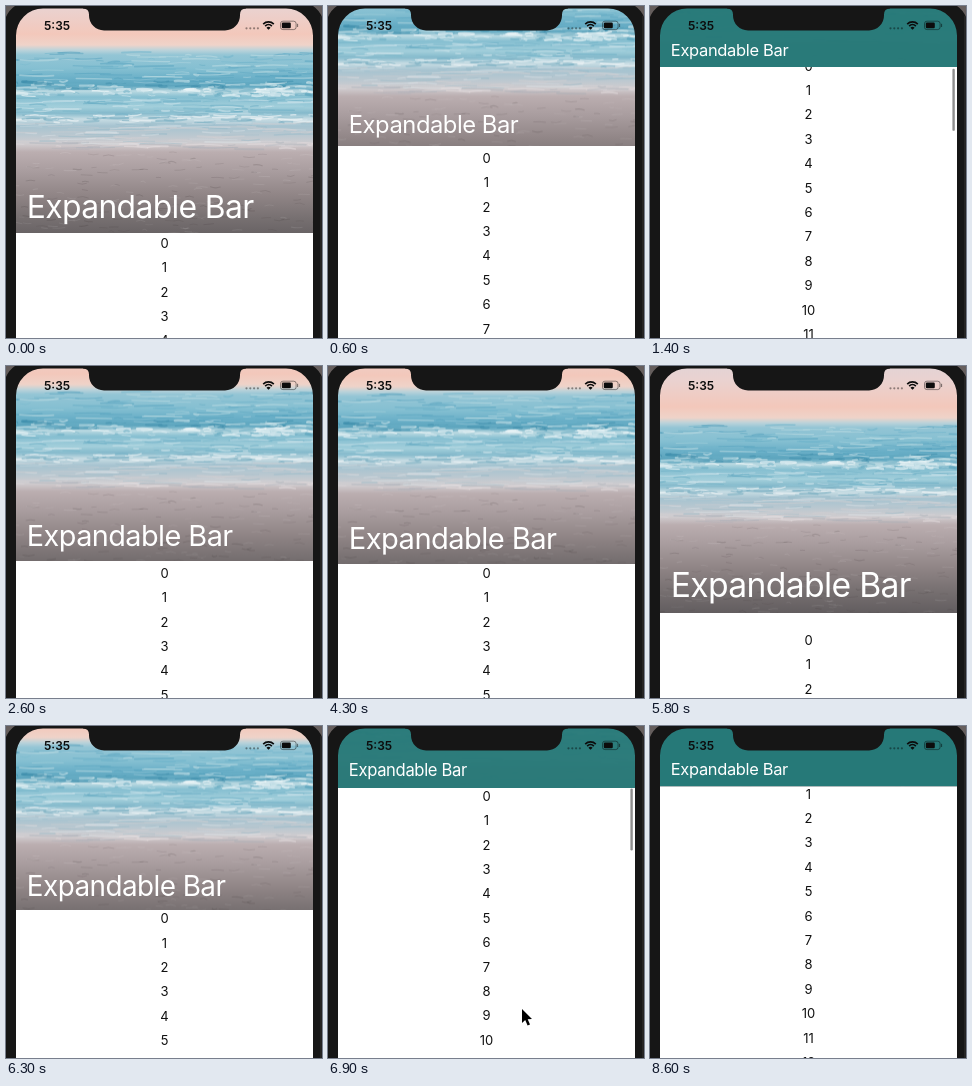
An HTML page with a canvas that plays this animation: 316 by 332 pixels, repeating every 8900 ms.

```html
<!DOCTYPE html>
<html lang="en">
<head>
<meta charset="utf-8">
<title>Expandable Bar</title>
<style>
html, body { margin: 0; width: 100%; height: 100%; overflow: hidden; background: #161616; }
canvas { display: block; width: 316px; height: 332px; }
</style>
</head>
<body>
<canvas id="stage"></canvas>
<script>
const W = 316, H = 332, LOOP = 8900, STEP = 100;
const FONT = 'Inter, "Liberation Sans", sans-serif';
const canvas = document.getElementById('stage');
const ratio = window.devicePixelRatio || 1;
canvas.width = W * ratio;
canvas.height = H * ratio;
const ctx = canvas.getContext('2d');
ctx.scale(ratio, ratio);

// time, bottom of the bar, centre of row 0
const KEYS = [
  [0, 227, 237], [300, 189, 200], [600, 140, 152], [900, 88, 99],
  [1200, 62, 70], [1500, 61, 58], [1800, 63, 72], [2200, 126, 138],
  [2600, 195, 207], [3000, 238, 250], [3300, 226, 236], [3700, 142, 153],
  [4000, 158, 168], [4300, 198, 207], [4700, 240, 252], [5100, 226, 236],
  [5500, 234, 250], [5800, 247, 274], [6100, 228, 240], [6500, 130, 140],
  [6900, 62, 70], [7300, 62, 43.5], [8900, 62, 43.5]
];
const POINTER = [[6500, 196, 262], [6900, 194, 283], [7300, 189, 267], [7500, 252, 150], [7600, 320, 48]];

const clamp = (v, lo = 0, hi = 1) => Math.min(hi, Math.max(lo, v));

// Smooth curve through the keys that rests at turning points
function track(keys, col, t) {
  let i = 0;
  while (i < keys.length - 2 && t >= keys[i + 1][0]) i++;
  const rate = k => (keys[k + 1][col] - keys[k][col]) / (keys[k + 1][0] - keys[k][0]);
  const slope = k => {
    if (k === 0) return rate(0);
    if (k === keys.length - 1) return rate(k - 1);
    const a = rate(k - 1), b = rate(k);
    return a * b <= 0 ? 0 : 2 * a * b / (a + b);
  };
  const a = keys[i], b = keys[i + 1], d = b[0] - a[0];
  const u = clamp((t - a[0]) / d), v = 1 - u;
  return v * v * (1 + 2 * u) * a[col] + u * u * (3 - 2 * u) * b[col]
    + d * u * v * (v * slope(i) - u * slope(i + 1));
}

let seed = 7;
function rnd(lo = 0, hi = 1) {
  seed = (seed * 16807) % 2147483647;
  return lo + (hi - lo) * seed / 2147483647;
}

// Beach: soft bands of sky, sea and sand
const TOP = 40, TALL = 300;
const beach = document.createElement('canvas');
beach.width = 297;
beach.height = TALL;
function paintBeach() {
  const c = beach.getContext('2d');
  c.translate(0, TOP);
  const sky = c.createLinearGradient(0, -TOP, 0, TALL - TOP);
  const bands = [
    [-40, '#d6d6e0'], [2, '#ead2d0'], [28, '#f3c8bb'], [39, '#efd3c9'], [44, '#bcd3da'],
    [49, '#93c5d5'], [62, '#86c0d2'], [73, '#69afc7'], [80, '#5da5be'], [85, '#bcdae2'],
    [91, '#86bfd1'], [101, '#a3cfdb'], [107, '#84b9cb'], [113, '#c8dde4'], [120, '#a6c3d0'],
    [130, '#bcc8d0'], [138, '#d0cccf'], [146, '#bbaeb0'], [165, '#a99d9f'], [188, '#918687'],
    [212, '#777071'], [235, '#625d5f'], [260, '#565254']
  ];
  for (const [y, col] of bands) sky.addColorStop((y + TOP) / TALL, col);
  c.fillStyle = sky;
  c.fillRect(0, -TOP, 297, TALL);

  const streaks = (n, y0, y1, len, thick, colours) => {
    for (let i = 0; i < n; i++) {
      const x = rnd(-20, 297), y = rnd(y0, y1), l = rnd(4, len);
      c.strokeStyle = colours[i % colours.length];
      c.lineWidth = rnd(0.5, thick);
      c.beginPath();
      c.moveTo(x, y);
      c.quadraticCurveTo(x + l / 2, y + rnd(-2, 2), x + l, y + rnd(-1, 1));
      c.stroke();
    }
  };
  c.lineCap = 'round';
  streaks(110, 46, 76, 40, 1.8, ['#c4e0e680', '#4f9dba70', '#6eb4cb80']);
  streaks(90, 75, 83, 26, 3, ['#3d8eab80', '#68aec580', '#d5e9ee80']);
  streaks(90, 82, 90, 16, 2.8, ['#eff7f9a0', '#d3e7eda0', '#5ca4bd70']);
  streaks(100, 92, 110, 44, 2, ['#d7eaf080', '#62a9c170', '#93c8d780']);
  streaks(70, 109, 117, 26, 2.2, ['#f0f5f7a0', '#74acc080']);
  streaks(70, 117, 138, 60, 2, ['#dde4e870', '#8db4c460', '#d3cfd270']);
  streaks(30, 136, 143, 50, 2, ['#e2dcde90', '#9fa9b350']);
  streaks(240, 146, 258, 12, 1.2, ['#ffffff18', '#2a202224']);
}

function roundRect(x, y, w, h, r) {
  ctx.beginPath();
  ctx.roundRect(x, y, w, h, r);
}

function text(str, x, y, size, weight, colour, align) {
  ctx.font = `${weight} ${size}px ${FONT}`;
  ctx.fillStyle = colour;
  ctx.textAlign = align;
  ctx.fillText(str, x, y);
}

function drawRows(first) {
  for (let i = 0; i < 13; i++) text(i, 158.5, first + i * 24.4 + 4.7, 13, 400, '#111', 'center');
}

function drawBar(bottom, tint) {
  ctx.save();
  ctx.beginPath();
  ctx.rect(10, 0, 297, bottom);
  ctx.clip();
  ctx.drawImage(beach, 10, (bottom - 227) * 0.64 - TOP);
  ctx.globalAlpha = tint;
  ctx.fillStyle = '#267978';
  ctx.fillRect(10, 0, 297, bottom);
  ctx.restore();
  const grow = bottom - 61;
  ctx.letterSpacing = '-0.02em';
  const size = 16.5 * (1 + grow * 0.0056);
  ctx.letterSpacing = `${-0.02 * size}px`;
  text('Expandable Bar', 20.8, bottom - 11.6 - grow * 0.022, size, 400, '#fff', 'left');
  ctx.letterSpacing = '0px';
}

function drawStatus() {
  text('5:35', 38, 23.5, 12, 600, '#0c0c0c', 'left');
  ctx.fillStyle = '#0006';
  for (let i = 0; i < 4; i++) {
    ctx.beginPath();
    ctx.arc(240.5 + i * 3.8, 22.3, 1.1, 0, 7);
    ctx.fill();
  }
  ctx.strokeStyle = ctx.fillStyle = '#0c0c0c';
  ctx.lineWidth = 1.7;
  for (const r of [7.6, 4.8]) {
    ctx.beginPath();
    ctx.arc(262.5, 23.5, r, -2.34, -0.8);
    ctx.stroke();
  }
  ctx.beginPath();
  ctx.moveTo(262.5, 23.8);
  ctx.arc(262.5, 23.8, 3, -2.34, -0.8);
  ctx.fill();
  roundRect(274.5, 15.2, 15.6, 8.4, 2.4);
  ctx.strokeStyle = '#0007';
  ctx.lineWidth = 0.9;
  ctx.stroke();
  roundRect(275.8, 16.5, 9, 5.8, 1.2);
  ctx.fill();
  ctx.fillStyle = '#0007';
  ctx.fillRect(291, 17.8, 1.1, 3.2);
}

function drawPhone() {
  // Bezel with the screen cut out
  ctx.fillStyle = '#161616';
  ctx.beginPath();
  ctx.rect(0, 0, W, H);
  ctx.roundRect(10, 2.5, 297, 400, 27);
  ctx.fill('evenodd');
  // Notch
  ctx.beginPath();
  ctx.moveTo(77, 0);
  ctx.lineTo(77, 2.5);
  ctx.quadraticCurveTo(83, 2.5, 83, 8.5);
  ctx.arcTo(83, 24.5, 98, 24.5, 15);
  ctx.lineTo(219, 24.5);
  ctx.arcTo(234, 24.5, 234, 8.5, 15);
  ctx.lineTo(234, 8.5);
  ctx.quadraticCurveTo(234, 2.5, 240, 2.5);
  ctx.lineTo(240, 0);
  ctx.fill();
  // Casing beyond the rounded corners
  ctx.fillStyle = '#655e5d';
  for (const [x, dir] of [[0, 1], [W, -1]]) {
    ctx.beginPath();
    ctx.moveTo(x, 0);
    ctx.lineTo(x + dir * 9, 0);
    ctx.quadraticCurveTo(x + dir * 3, 4, x, 11);
    ctx.fill();
  }
  ctx.fillStyle = '#343232';
  ctx.fillRect(314.5, 10, 1, H);
}

function drawPointer(x, y) {
  ctx.save();
  ctx.translate(x, y);
  ctx.beginPath();
  for (const [px, py] of [[0, 0], [0, 14], [3.2, 11], [5.6, 16.6], [8, 15.6], [5.7, 10.2], [10, 10]]) ctx.lineTo(px, py);
  ctx.closePath();
  ctx.lineWidth = 2;
  ctx.strokeStyle = '#fff';
  ctx.stroke();
  ctx.fillStyle = '#000';
  ctx.fill();
  ctx.restore();
}

function draw(t) {
  const settled = t >= 8000;
  const bottom = settled ? 60.4 : track(KEYS, 1, t);
  const first = track(KEYS, 2, t);
  ctx.fillStyle = '#fff';
  ctx.fillRect(0, 0, W, H);
  drawRows(first);
  drawBar(bottom, settled ? 1 : clamp((108 - bottom) / 48));
  if (bottom < 68) {
    ctx.globalAlpha = clamp((8600 - t) / 300);
    ctx.fillStyle = '#8e8e8e';
    roundRect(302.4, bottom + 0.5 + clamp((70 - first) * 0.12, 0, 9), 2.4, 62, 1.2);
    ctx.fill();
    ctx.globalAlpha = 1;
  }
  drawStatus();
  drawPhone();
  if (t >= 6500 && t < 7600) drawPointer(track(POINTER, 1, t), track(POINTER, 2, t));
}

paintBeach();
const start = performance.now();
function frame() {
  const t = (performance.now() - start) % LOOP;
  draw(Math.floor(t / STEP) * STEP);
  requestAnimationFrame(frame);
}
frame();
</script>
</body>
</html>
```
